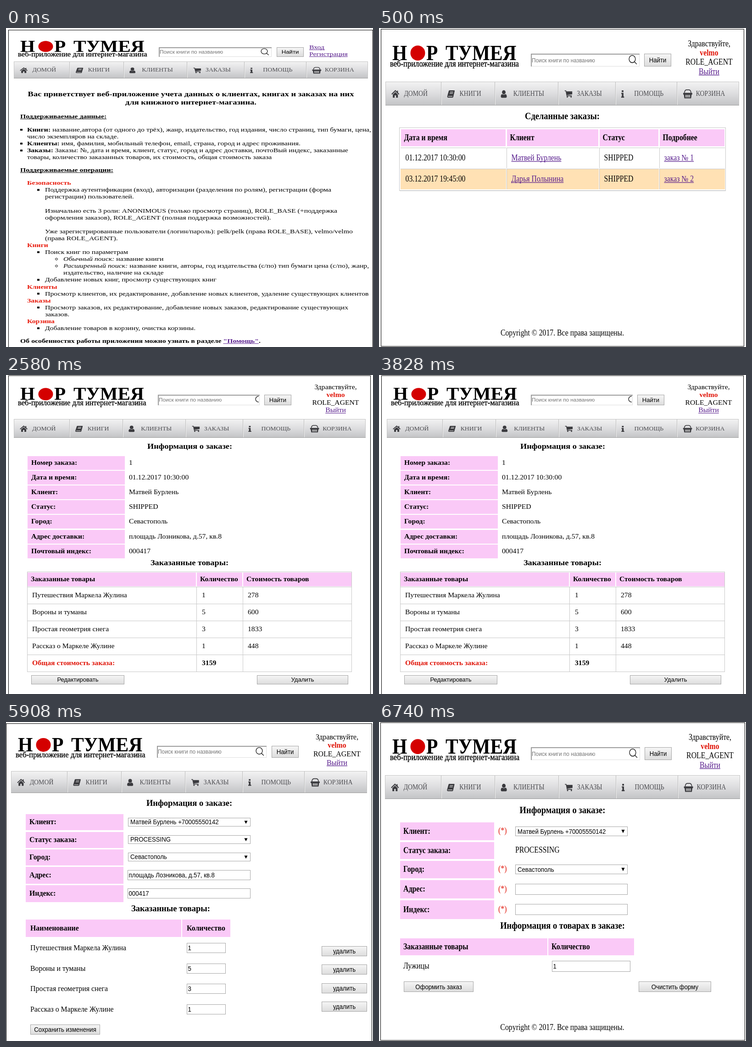
These frames come from a looping animation (800x696 px, 8 s). An HTML page with a canvas:

```html
<!DOCTYPE html>
<html lang="ru">
<head>
<meta charset="utf-8">
<title>Книжный интернет-магазин</title>
<style>
html, body { margin: 0; width: 100%; height: 100%; overflow: hidden; background: #fff; }
canvas { display: block; }
</style>
</head>
<body>
<canvas id="stage" width="800" height="696"></canvas>
<script>
const ctx = document.getElementById('stage').getContext('2d');
const SERIF = '"Liberation Serif", "Times New Roman", serif';
const SANS = '"Liberation Sans", Arial, sans-serif';
const PINK = '#fac9f7', AMBER = '#ffe1b4', RED = '#e01408', LINK = '#551a8b', GRID = '#c8c8c8';
const CLIENT = 'Матвей Бурлень', PHONE = '+70005550142', CITY = 'Севастополь';
const ADDRESS = 'площадь Лозникова, д.57, кв.8', ZIP = '000417', LOGIN = 'velmo';
const GOODS = [
  ['Путешествия Маркела Жулина', 1, 278], ['Вороны и туманы', 5, 600],
  ['Простая геометрия снега', 3, 1833], ['Рассказ о Маркеле Жулине', 1, 448]
];
let sx = 1, sy = 1; // page zoom of the current scene

function text(s, x, y, o = {}) {
  ctx.save();
  ctx.translate(x, y);
  ctx.scale(sx, sy);
  ctx.font = `${o.italic ? 'italic ' : ''}${o.bold ? 'bold ' : ''}${o.size || 16}px ${o.sans ? SANS : SERIF}`;
  ctx.fillStyle = ctx.strokeStyle = o.color || '#000';
  const w = ctx.measureText(s).width, left = o.center ? -w / 2 : 0;
  ctx.fillText(s, left, 0);
  if (o.stroke) { ctx.lineWidth = o.stroke; ctx.strokeText(s, left, 0); }
  if (o.line) ctx.fillRect(left, 1.4, w, 1.1);
  ctx.restore();
  return w * sx;
}
const bold = (s, x, y, o) => text(s, x, y, { bold: true, ...o });
const link = (s, x, y, o) => text(s, x, y, { color: LINK, line: true, ...o });
const sans = (s, x, y, o) => text(s, x, y, { sans: true, size: 13.333, ...o });
const title = (s, x, y) => bold(s, x, y, { size: 18.72, center: true });

function rect(l, t, r, b, color) {
  ctx.fillStyle = color;
  ctx.fillRect(l, t, r - l, b - t);
}
function frame(l, t, r, b, color) {
  ctx.strokeStyle = color;
  ctx.lineWidth = 1;
  ctx.strokeRect(l + 0.5, t + 0.5, r - l - 1, b - t - 1);
}
function shade(l, t, r, b, ...colors) {
  const g = ctx.createLinearGradient(0, t, 0, b);
  colors.forEach((c, i) => g.addColorStop(i / (colors.length - 1), c));
  rect(l, t, r, b, g);
}
function button(l, t, r, b, label) {
  shade(l, t, r, b, '#f6f6f6', '#dcdcdc');
  frame(l, t, r, b, '#a4a4a4');
  sans(label, (l + r) / 2, (t + b) / 2 + 4.7 * sy, { center: true });
}
function input(l, t, r, b, value = '') {
  rect(l, t, r, b, '#fff');
  frame(l, t, r, b, '#a6a6a6');
  sans(String(value), l + 2.5, (t + b) / 2 + 4.8 * sy);
}
function select(l, t, r, b, value) {
  input(l, t, r, b);
  sans(value, l + 5, (t + b) / 2 + 4.8 * sy);
  const x = r - 10, y = (t + b) / 2;
  ctx.fillStyle = '#000';
  ctx.beginPath();
  ctx.moveTo(x - 3.5, y - 3 * sy);
  ctx.lineTo(x + 3.5, y - 3 * sy);
  ctx.lineTo(x, y + 3.5 * sy);
  ctx.fill();
}

const ICONS = {
  home: { fill: 'M-5.6 1.2L0-3.8 5.6 1.2V7H1.6V2.6H-1.6V7H-5.6ZM3.6-6.4H5.8V-2H3.6Z', line: 'M-8 .6L0-6.4 8 .6', w: 1.9 },
  book: { fill: 'M-3.5-7H7.5Q8.6-7 8.2-5.6L5.2 5.6Q4.8 7 3.4 7H-6.4Q-8.8 6.4-8 4L-5-5.6Q-4.6-7-3.5-7Z', light: 'M-2-3.8H5M-2.8-1.2H4.2M-6.4 4.6H3.4', w: 1.1 },
  person: { fill: 'M0-7.4A3.9 3.9 0 0 1 0 .6 3.9 3.9 0 0 1 0-7.4ZM-3.6.2Q0 2.4 3.6.2 6.6.8 6.6 5 6.6 7.2 4.4 7.2H-4.4Q-6.6 7.2-6.6 5-6.6.8-3.6.2Z' },
  cart: { fill: 'M-5-5H8.4V.6L-3.6 2.2ZM-4 5.6a1.5 1.5 0 1 0 3 0a1.5 1.5 0 1 0-3 0M4.4 5.6a1.5 1.5 0 1 0 3 0a1.5 1.5 0 1 0-3 0', line: 'M-8.4-6.2H-5.6L-3.4 3.4H7.4', w: 1.5 },
  info: { fill: 'M-2-7H1.8V-3.8H-2ZM-3-2.2H1.8V4.8H3.2V7H-3.2V4.8H-1.8V0H-3Z' },
  basket: { fill: 'M-10-2.2H10V1H8.6L7.4 8.4H-7.4L-8.6 1H-10Z', line: 'M-7-2V-4Q-6-8-2-8H2Q6-8 7-4V-2', light: 'M-4.2 1.6V6.6M-1.4 1.6V6.6M1.4 1.6V6.6M4.2 1.6V6.6', w: 1.6 }
};
function icon(name, x, y) {
  const { fill, line, light, w } = ICONS[name];
  ctx.save();
  ctx.translate(x, y);
  ctx.scale(sx, sy);
  ctx.fillStyle = ctx.strokeStyle = '#3a3a3e';
  ctx.lineWidth = w || 1;
  ctx.fill(new Path2D(fill));
  if (line) ctx.stroke(new Path2D(line));
  ctx.strokeStyle = '#dcdcdc';
  if (light) ctx.stroke(new Path2D(light));
  ctx.restore();
}

// label, text offset, icon offset, left separator
const MENU = [
  ['home', 'ДОМОЙ', 41, 22, 0], ['book', 'КНИГИ', 164, 145, 124],
  ['person', 'КЛИЕНТЫ', 283, 262, 243], ['cart', 'ЗАКАЗЫ', 423.5, 405, 383],
  ['info', 'ПОМОЩЬ', 550.5, 525, 510], ['basket', 'КОРЗИНА', 687, 669, 646]
];
function menu([l, t, r, b]) {
  const mid = (t + b) / 2;
  shade(l, t, r, b, '#f3f3f3', '#dddddf', '#c2c3c5');
  frame(l, t, r, b, '#c4c4c4');
  rect(l, b - 1, r, b, '#9c9c9c');
  for (const [name, label, tx, ix, sep] of MENU) {
    if (sep) {
      const x = Math.round(l + sep * sx);
      rect(x - 1, t + 1, x, b - 1, '#bdbdbd');
      rect(x, t + 1, x + 1, b - 1, '#f0f0f0');
    }
    icon(name, l + ix * sx, mid + 1);
    text(label, l + tx * sx, mid + 4.5 * sy, { size: 14, color: '#4c4c50' });
  }
}

function logo([x, y]) {
  const base = y - 12.4 * sy, big = { size: 42 };
  bold('Н', x + 5, base, big);
  bold('Р', x + 79, base, big);
  bold('ТУМЕЯ', x + 121, base, big);
  ctx.fillStyle = '#d40000';
  ctx.beginPath();
  ctx.ellipse(x + 60.5, base - 13.6 * sy, 16, 14.4 * sy, 0, 0, 7);
  ctx.fill();
  text('веб-приложение для интернет-магазина', x, y, { size: 16.85, stroke: 0.35 });
}

function search([l, t, r, b], buttonX, cut) {
  const mid = (t + b) / 2;
  rect(l, t, r, b, '#fff');
  frame(l, t, r, b, '#dedede');
  rect(l, t, r, t + 2, '#9b9b9b');
  rect(l, t, l + 2, b, '#9b9b9b');
  sans('Поиск книги по названию', l + 2, mid + 4 * sy, { size: 12, color: '#757575' });
  ctx.save();
  ctx.beginPath();
  ctx.rect(l, t, r - l - 2, b - t);
  ctx.clip();
  ctx.translate(cut ? r - 2 : r - 16, mid - 2 * sy);
  ctx.scale(sx, sy);
  ctx.strokeStyle = '#222';
  ctx.lineWidth = 1.4;
  ctx.beginPath();
  ctx.arc(0, 0, 7, 0, 7);
  ctx.moveTo(4.8, 5);
  ctx.lineTo(10, 10);
  ctx.stroke();
  ctx.restore();
  button(buttonX, t, buttonX + 59, b, 'Найти');
}

function greeting(x, y) {
  const step = 18 * sy, center = { center: true };
  text('Здравствуйте,', x, y, center);
  bold(LOGIN, x, y + step, { center: true, color: RED });
  text('ROLE_AGENT', x, y + 2 * step, center);
  link('Выйти', x, y + 3 * step, center);
}
const footer = y => text('Copyright © 2017. Все права защищены.', 399.5, y, { center: true });

function home() {
  link('Вход', 661, 46);
  link('Регистрация', 661, 61);
  title('Вас приветствует веб-приложение учета данных о клиентах, книгах и заказах на них', 403, 148.5);
  title('для книжного интернет-магазина.', 403, 166.5);
  bold('Поддерживаемые данные:', 31, 197, { line: true });
  bold('Поддерживаемые операции:', 31, 314, { line: true });

  const square = (x, y) => rect(x, y - 6, x + 5, y - 2, '#000');
  const data = [
    ['Книги:', ' название,автора (от одного до трёх), жанр, издательство, год издания, число страниц, тип бумаги, цена,'],
    ['', 'число экземпляров на складе.'],
    ['Клиенты:', ' имя, фамилия, мобильный телефон, email, страна, город и адрес проживания.'],
    ['Заказы:', ' Заказы: №, дата и время, клиент, статус, город и адрес доставки, почтоВый индекс, заказанные'],
    ['', 'товары, количество заказанных товаров, их стоимость, общая стоимость заказа']
  ];
  data.forEach(([head, rest], i) => {
    const y = 226 + 15.1 * i;
    if (head) square(31, y);
    text(rest, 46 + (head ? bold(head, 46, y) : 0), y);
  });

  // '#' section, '*' bullet, 'o' nested bullet, '+' nested continuation
  const ops = `#Безопасность
*Поддержка аутентификации (вход), авторизации (разделения по ролям), регистрации (форма
 регистрации) пользователей.

 Изначально есть 3 роли: ANONIMOUS (только просмотр страниц), ROLE_BASE (+поддержка
 оформления заказов), ROLE_AGENT (полная поддержка возможностей).

 Уже зарегистрированные пользователи (логин/пароль): pelk/pelk (права ROLE_BASE), ${LOGIN}/${LOGIN}
 (права ROLE_AGENT).
#Книги
*Поиск книг по параметрам
oОбычный поиск:| название книги
oРасширенный поиск:| название книги, авторы, год издательства (с/по) тип бумаги цена (с/по), жанр,
+издательство, наличие на складе
*Добавление новых книг, просмотр существующих книг
#Клиенты
*Просмотр клиентов, их редактирование, добавление новых клиентов, удаление существующих клиентов
#Заказы
*Просмотр заказов, их редактирование, добавление новых заказов, редактирование существующих
 заказов.
#Корзина
*Добавление товаров в корзину, очистка корзины.`;
  ops.split('\n').forEach((row, i) => {
    const y = 342.2 + 15.09 * i, kind = row[0], s = row.slice(1);
    if (kind === '#') return bold(s, 46, y, { color: '#e81a0c' });
    if (kind === '*') square(68, y);
    if (kind === 'o') {
      ctx.strokeStyle = '#000';
      ctx.lineWidth = 1;
      ctx.beginPath();
      ctx.ellipse(110, y - 4, 2.5, 2.1, 0, 0, 7);
      ctx.stroke();
      const [name, rest] = s.split('|');
      text(rest, 125 + text(name, 125, y, { italic: true }), y);
    } else text(s, kind === '+' ? 125 : 85, y);
  });
  const w = bold('Об особенностях работы приложения можно узнать в разделе ', 31, 687);
  const v = link('"Помощь"', 31 + w, 687, { bold: true });
  bold('.', 31 + w + v, 687);
}

function orders() {
  title('Сделанные заказы:', 399.5, 199);
  rect(45, 354, 756, 356, '#dcdcdc');
  frame(44, 217, 756, 355, GRID);
  const cols = [[48, 276], [279, 478], [481, 609], [612, 753]];
  const heads = ['Дата и время', 'Клиент', 'Статус', 'Подробнее'];
  const rows = [
    ['01.12.2017 10:30:00', CLIENT, 'SHIPPED', 'заказ № 1'],
    ['03.12.2017 19:45:00', 'Дарья Полынина', 'SHIPPED', 'заказ № 2']
  ];
  cols.forEach(([l, r], i) => {
    rect(l, 221, r, 258, PINK);
    bold(heads[i], l + 6.5, 245);
    rows.forEach((row, k) => {
      const t = 261 + 46 * k;
      rect(l - 1, t, r + 1, t + 45, GRID);
      rect(i ? l : l - 1, t + 1, r + 1, t + 45, k ? AMBER : '#fff');
      (i % 2 ? link : text)(row[i], l + 9.5, 289 + 46 * k);
    });
  });
  footer(671);
}

function order() {
  title('Информация о заказе:', 400.5, 161);
  const facts = [
    ['Номер заказа:', '1'], ['Дата и время:', '01.12.2017 10:30:00'], ['Клиент:', CLIENT],
    ['Статус:', 'SHIPPED'], ['Город:', CITY], ['Адрес доставки:', ADDRESS], ['Почтовый индекс:', ZIP]
  ];
  facts.forEach(([name, value], i) => {
    const t = Math.round(177 + 32.1 * i);
    rect(47, t, 259, t + 30, PINK);
    bold(name, 55, t + 19);
    text(value, 268, t + 19);
  });
  title('Заказанные товары:', 400, 415);
  frame(46, 429, 754, 648, GRID);
  [[47, 414, 'Заказанные товары'], [416, 515, 'Количество'], [517, 753, 'Стоимость товаров']].forEach(([l, r, s]) => {
    rect(l, 431, r, 461, PINK);
    bold(s, l + 7, 450);
    if (l > 47) rect(l - 1, 462, l, 647, GRID);
  });
  for (let y = 462; y < 650; y += 37) rect(47, y, 754, y + 1, GRID);
  GOODS.forEach((row, i) => row.forEach((s, k) => text(String(s), [57, 427, 527][k], 485 + 37 * i)));
  bold('Общая стоимость заказа:', 57, 633, { color: RED });
  bold('3159', 427, 633);
  button(55, 655, 258, 675, 'Редактировать');
  button(547, 655, 746, 675, 'Удалить');
}

const FIELDS = ['Клиент:', 'Статус заказа:', 'Город:', 'Адрес:', 'Индекс:'];
function labels(l, r, spans, x) {
  spans.forEach(([t, b], i) => {
    rect(l, t, r, b, PINK);
    bold(FIELDS[i], x, (t + b) / 2 + 4.7 * sy);
  });
}

function edit() {
  title('Информация о заказе:', 399.5, 183);
  labels(43, 256, [[201, 236], [240, 275], [278, 313], [316, 353], [356, 393]], 51);
  select(266, 209, 533, 228, CLIENT + ' ' + PHONE);
  select(266, 247, 533, 266, 'PROCESSING');
  select(266, 285, 533, 304, CITY);
  input(265, 323, 533, 345, ADDRESS);
  input(265, 363, 533, 385, ZIP);
  title('Заказанные товары:', 359, 413);
  rect(43, 431, 382, 469, PINK);
  rect(384, 431, 489, 469, PINK);
  bold('Наименование', 53, 455);
  bold('Количество', 394, 455);
  GOODS.forEach(([name, count], i) => {
    const t = Math.round(482 + 44.5 * i), d = Math.round(489 + 40.3 * i);
    text(name, 53, t + 15.5);
    input(394, t, 479, t + 22, count);
    button(688, d, 787, d + 22, 'удалить');
  });
  button(53, 660, 205, 682, 'Сохранить изменения');
}

function checkout() {
  title('Информация о заказе:', 400, 198.5);
  labels(46, 251, [[219, 258], [262, 299], [303, 341], [345, 385], [389, 430]], 53);
  for (const y of [243, 326, 370, 414]) text('(*)', 260, y, { color: RED });
  select(297, 228, 542, 249, CLIENT + ' ' + PHONE);
  text('PROCESSING', 297, 285);
  select(297, 311, 542, 332, CITY);
  input(297, 353, 542, 377);
  input(297, 397, 542, 421);
  title('Информация о товарах в заказе:', 400, 451);
  rect(46, 472, 367, 509, PINK);
  rect(369, 472, 556, 509, PINK);
  bold('Заказанные товары', 53, 496);
  bold('Количество', 376, 496);
  text('Лужицы', 53, 538);
  input(377, 521, 548, 545, 1);
  button(54, 566, 206, 589, 'Оформить заказ');
  button(566, 566, 724, 589, 'Очистить форму');
  footer(672);
}

const SCENES = [
  { end: 500, zoom: [0.987, 0.836], box: [5, 4, 800, 720], logo: [26, 62], field: [333, 42, 579, 63], find: 590, menu: [17, 73, 789, 110], body: home },
  { end: 2580, zoom: [0.985, 1.13], box: [4, 2, 796, 695], logo: [24, 84], field: [331, 56, 568, 84], find: 578, menu: [14, 117, 785, 169], hello: [719.5, 39.5], body: orders },
  { end: 4660, zoom: [0.98, 0.935], box: [5, 1, 795, 720], logo: [26, 66], field: [331, 43, 553, 66], find: 563, cut: true, menu: [17, 96, 784, 137], hello: [718.5, 31], body: order },
  { end: 6740, zoom: [0.991, 1.04], box: [0, 3, 798, 720], logo: [21, 77], field: [329, 52, 568, 78], find: 579, menu: [11, 107, 787, 155], hello: [721.5, 37.5], body: edit },
  { end: 8000, zoom: [0.989, 1.13], box: [3, 1, 798, 695], logo: [24, 83], field: [331, 55, 569, 83], find: 579, menu: [13, 116, 787, 168], hello: [721.5, 38.5], body: checkout }
];

function draw(s) {
  [sx, sy] = s.zoom;
  rect(0, 0, 800, 696, '#fff');
  frame(...s.box, '#000');
  logo(s.logo);
  search(s.field, s.find, s.cut);
  menu(s.menu);
  if (s.hello) greeting(...s.hello);
  s.body();
}

let shown;
function tick() {
  const t = performance.now() % 8000;
  const scene = SCENES.find(s => t < s.end);
  if (scene !== shown) draw(shown = scene);
  requestAnimationFrame(tick);
}
tick();
</script>
</body>
</html>
```
